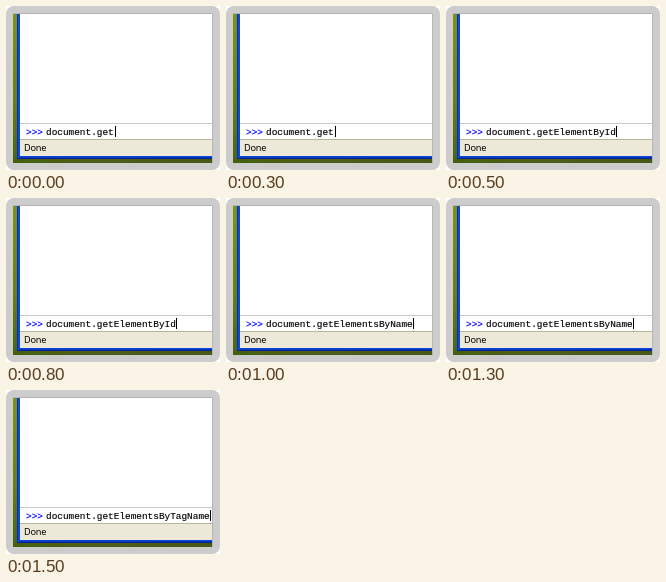
Write an HTML page that moves like this. It is 214 by 164 pixels and loops after 2 s.

```html
<!DOCTYPE html>
<html lang="en">
<head>
<meta charset="utf-8">
<title>Console typing</title>
<style>
  html, body { margin: 0; width: 100%; height: 100%; overflow: hidden; background: #fff; }
  svg { display: block; width: 214px; height: 164px; }
  .mono { font: 9.42px "Liberation Mono", "Courier New", monospace; white-space: pre; stroke-width: .15; }
  .ui { font: 9.2px "Noto Sans", "Open Sans", sans-serif; letter-spacing: -.25px; }
  .entry { visibility: hidden; animation: show 2s step-end calc(var(--i) * .5s - 2s) infinite; }
  @keyframes show {
    0% { visibility: visible; }
    25%, 100% { visibility: hidden; }
  }
</style>
</head>
<body>
<svg viewBox="0 0 214 164">
  <defs>
    <linearGradient id="side" x2="0" y2="1">
      <stop offset="0" stop-color="#7f921c"/>
      <stop offset=".3" stop-color="#71891a"/>
      <stop offset=".65" stop-color="#687c14"/>
      <stop offset="1" stop-color="#4c6416"/>
    </linearGradient>
    <linearGradient id="ground">
      <stop offset="0" stop-color="#46600f"/>
      <stop offset=".5" stop-color="#4a5e18"/>
      <stop offset="1" stop-color="#465a14"/>
    </linearGradient>
    <linearGradient id="left">
      <stop offset="0" stop-color="#0420a8"/>
      <stop offset=".5" stop-color="#0c48dc"/>
      <stop offset="1" stop-color="#0a4ccc"/>
    </linearGradient>
    <linearGradient id="bottom" x2="0" y2="1">
      <stop offset="0" stop-color="#0a50d8"/>
      <stop offset=".5" stop-color="#0636c0"/>
      <stop offset="1" stop-color="#001684"/>
    </linearGradient>
  </defs>

  <rect width="214" height="164" rx="8" fill="#ccc"/>
  <rect x="7" y="7" width="200" height="150" fill="url(#ground)"/>
  <rect x="7" y="7" width="5" height="146" fill="url(#side)"/>
  <rect x="11" y="150" width="196" height="3" fill="url(#bottom)"/>
  <rect x="11" y="7" width="3" height="145" fill="url(#left)"/>
  <rect x="14" y="7" width="193" height="126" fill="#fff"/>
  <rect x="14" y="117" width="193" height="1" fill="#c8c8c8"/>
  <rect x="14" y="133" width="193" height="1" fill="#b8b4a4"/>
  <rect x="14" y="134" width="193" height="16" fill="#ece9d8"/>
  <path d="M7 7.5H206.5V157" fill="none" stroke="#b4b4b4"/>

  <text class="mono" x="20" y="129" fill="#00f" stroke="#00f">&gt;&gt;&gt;</text>
  <g class="entry" style="--i:0">
    <text class="mono" x="40" y="129" stroke="#000">document.get</text>
    <rect x="109" y="120" width="1" height="11"/>
  </g>
  <g class="entry" style="--i:1">
    <text class="mono" x="40" y="129" stroke="#000">document.getElementById</text>
    <rect x="170" y="120" width="1" height="11"/>
  </g>
  <g class="entry" style="--i:2">
    <text class="mono" x="40" y="129" stroke="#000">document.getElementsByName</text>
    <rect x="187" y="120" width="1" height="11"/>
  </g>
  <g class="entry" style="--i:3">
    <text class="mono" x="40" y="129" stroke="#000">document.getElementsByTagName</text>
    <rect x="204" y="120" width="1" height="11"/>
  </g>
  <text class="ui" x="18" y="145">Done</text>
</svg>
</body>
</html>
```
